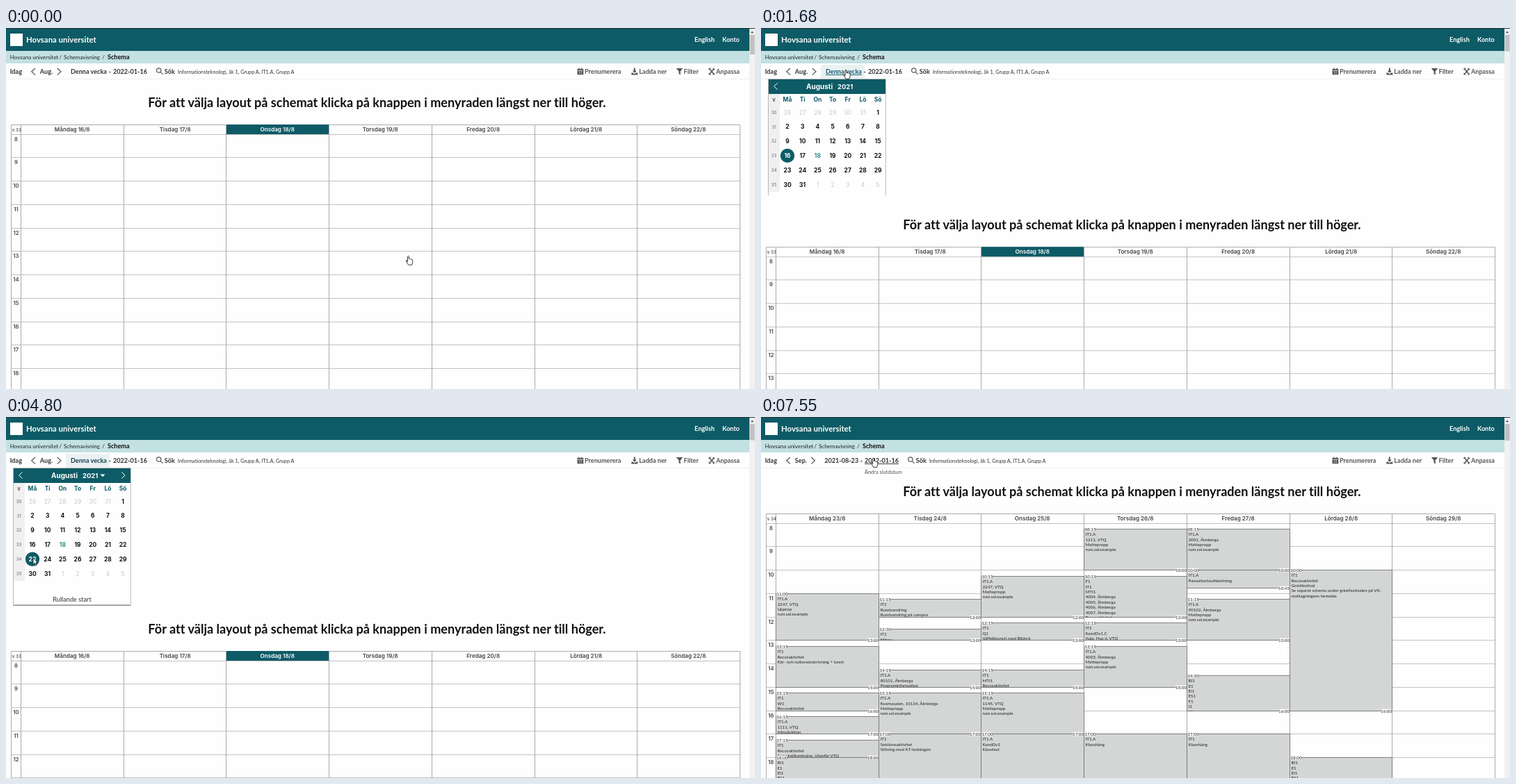
These frames come from a looping animation (1077x520 px, 8000 ms). An HTML page:

```html
<!DOCTYPE html>
<html lang="sv">
<head>
<meta charset="utf-8">
<title>Schema</title>
<style>
  html, body { margin: 0; width: 100%; height: 100%; overflow: hidden; background: #fefefe; }
  text { white-space: pre; }
  #stage { display: block; font: 700 9.1px Lato, sans-serif; font-variant-ligatures: none; fill: #333; }
  .geo { font-family: Inter, sans-serif; }
  .line { fill: none; stroke: #555; stroke-width: 1.2; }
</style>
</head>
<body>
<svg id="stage" width="1077" height="520" viewBox="0 0 1077 520"></svg>
<script>
const TEAL = '#0d5b66', LOOP = 8000, OPEN = 198;
const DAYS = ['Måndag', 'Tisdag', 'Onsdag', 'Torsdag', 'Fredag', 'Lördag', 'Söndag'];
const URL_LINE = 'rum.sal.example', HOUSE = 'Ålmberga', HALL = 'VTQ';
const MATH = 'Mattepropp|' + URL_LINE, EVENT = 'Recceaktivitet', PROGRAMS = 'BI1|E1|EI1|ES1';

// day, start hour, end hour, lines
const EVENTS = [
  [0, 11, 13, `IT1.A|2247, ${HALL}|Upprop|${URL_LINE}`],
  [0, 13.25, 15, `IT1|${EVENT}|Kår- och nationsinskrivning + lunch`],
  [0, 15.25, 16, `IT1|W1|${EVENT}`],
  [0, 16.25, 17, `IT1.A|1111, ${HALL}|Introduktion`],
  [0, 17.25, 18, `IT1|${EVENT}|Servetstillverkning, Utanför ${HALL}`],
  [0, 18, 22, PROGRAMS],
  [1, 11.25, 12, 'IT1|Rundvandring|Rundvandring på campus'],
  [1, 12.5, 13, 'IT1|Mässa'],
  [1, 14.25, 15, `IT1.A|80101, ${HOUSE}|Programinformation`],
  [1, 15.25, 17, `IT1.A|Kvarnasalen, 10134, ${HOUSE}|${MATH}`],
  [1, 17, 22, 'IT1|Sektionsaktivitet|Sittning med KT-ledningen'],
  [2, 10.25, 12, `IT1.A|2247, ${HALL}|${MATH}`],
  [2, 12.25, 13, 'IT1|Q1|Våffelbrunch med Bildvrå'],
  [2, 14.25, 15, `IT1|MTI1|${EVENT}`],
  [2, 15.25, 17, `IT1.A|1145, ${HALL}|${MATH}`],
  [2, 17, 22, 'IT1.A|KandDv1|Klassfest'],
  [3, 8.25, 10, `IT1.A|1211, ${HALL}|${MATH}`],
  [3, 10.25, 12, `F1|IT1|MTI1|4004, ${HOUSE}|4005, ${HOUSE}|4006, ${HOUSE}|4007, ${HOUSE}|${EVENT}`],
  [3, 12.25, 13, `IT1|KandDv1.C|Aula, Hus 6, ${HALL}`],
  [3, 13.25, 15, `IT1.A|4003, ${HOUSE}|${MATH}`],
  [3, 17, 22, 'IT1.A|Klasshäng'],
  [4, 8.25, 10, `IT1.A|2001, ${HOUSE}|${MATH}`],
  [4, 10, 10.75, 'IT1.A|Passerkortsuthämtning'],
  [4, 11.25, 13, `IT1.A|90102, ${HOUSE}|${MATH}`],
  [4, 14.5, 16, PROGRAMS + '|F1|I1|IT1'],
  [4, 17, 22, 'IT1|Klasshäng'],
  [5, 10, 16, `IT1|${EVENT}|Gnistfestival|Se separat schema under gnistfestivalen på VK-|mottagningens hemsida.`],
  [5, 18, 22, PROGRAMS],
];

const text = (x, y, s, attrs = '') => `<text x="${x}" y="${y}" ${attrs}>${s}</text>`;
const mid = (x, y, s, attrs = '') => text(x, y, s, 'text-anchor="middle" ' + attrs);
const rect = (x, y, w, h, fill, attrs = '') =>
  `<rect x="${x}" y="${y}" width="${w}" height="${h}" fill="${fill}" ${attrs}/>`;
const path = (d, attrs = 'class="line"') => `<path d="${d}" ${attrs}/>`;
const range = n => [...Array(n).keys()];

// Grid positions, snapped to pixel centres
const snap = v => Math.floor(v) + .5;
const colX = d => snap(21.4 + 147.75 * d);
const hourY = h => snap(153.2 + 33.75 * (h - 8));
const clock = h => String(Math.floor(h)).padStart(2, '0') + ':' + String(h % 1 * 60).padStart(2, '0');

function eventBox([day, from, to, lines]) {
  const x = colX(day), w = colX(day + 1) - x, y = hourY(from), h = hourY(to) - y;
  const rows = lines.split('|').map((s, i) => text(2, 9.9 + 7.35 * i, s)).join('');
  return rect(x, y, w, h, '#d4d6d6', 'stroke="#777" stroke-width=".9"') +
    `<svg x="${x}" y="${y}" width="${w}" height="${h}">${rows}</svg>`;
}

function eventTimes([day, from, to]) {
  const x = colX(day), right = colX(day + 1), y = hourY(from), end = hourY(to);
  return rect(x + 1, y - 2.7, 15.6, 5.6, '#fefefe') + text(x + 1, y + 2.4, clock(from)) +
    rect(right - 16, end - 2.7, 15.6, 5.6, '#fefefe') +
    text(right - .4, end + 2.4, clock(to), 'text-anchor="end"');
}

function schedule(id, week, date, today, events) {
  let s = mid(533.5, 113.5, 'För att välja layout på schemat klicka på knappen i menyraden längst ner till höger.',
    'font-size="18.1" fill="#111"');
  s += path(range(14).map(i => `M7.5 ${hourY(8 + i)}H1055.5`).join(''), 'stroke="#c2c2c2"');
  s += path('M7.5 139.5H1055.5M7.5 139.5V760' + range(8).map(d => `M${colX(d)} 139.5V760`).join(''),
    'stroke="#aaa"');
  s += '<g class="geo" font-size="8.1" font-weight="600" fill="#444">';
  s += text(8.8, 148.8, 'v ' + week, 'font-size="6.2" font-weight="500"');
  if (today >= 0) s += rect(317, 139, 147, 14, TEAL);
  DAYS.forEach((name, d) => {
    s += mid(colX(d) + 73.7, 149.2, `${name} ${date + d}/8`, d === today ? 'fill="#fff"' : '');
  });
  for (const i of range(14)) s += mid(14.4, hourY(8 + i) + 9.7, 8 + i, 'font-size="7.7"');
  s += '</g><g font-size="6.24" font-weight="400" fill="#222">';
  s += events.map(eventBox).join('') + events.map(eventTimes).join('');
  return `<g id="${id}">${s}</g></g>`;
}

// Left half of the toolbar; dx moves everything after the start date
function period(id, month, arrow, start, from, dx) {
  return `<g id="${id}">` +
    text(48.8, 66, month) + path(`M${arrow} 58l5.2 4.8l-5.2 4.8`) +
    text(start, 66, from, `id="${id}From"`) + text(147.6 + dx, 66, '-') +
    text(154 + dx, 66, '2022-01-16', `id="${id}To"`) +
    `<circle cx="${219.8 + dx}" cy="61" r="3.2" class="line"/>` + path(`M${222.2 + dx} 63.4l3.4 3.4`) +
    text(227.8 + dx, 66, 'Sök') +
    text(247 + dx, 65.6, 'Informationsteknologi, åk 1, Grupp A, IT1.A, Grupp A', 'font-size="7.25" font-weight="400"') +
    '</g>';
}

const dayX = i => 38 + 21.68 * i, weekY = i => 121.5 + 20.8 * i;

function chosen(id, row, n) {
  return `<g id="${id}"><circle cx="38" cy="${weekY(row)}" r="10.2" fill="${TEAL}"/>` +
    mid(38, weekY(row) + 3.1, n, 'fill="#fff"') + '</g>';
}

function calendar() {
  let s = rect(10.5, 73.5, 168.7, 197.5, '#fefefe', 'stroke="#b0b0b0" stroke-width=".9"');
  s += path('M10.5 271.2H179.3', 'stroke="#888" stroke-width="1.2"');
  s += rect(11, 74, 168, 21, TEAL) + rect(11, 95, 16, 141, '#f0f0f0');
  s += '<g class="geo" font-size="8.5">';
  s += text(65, 87.7, 'Augusti', 'font-size="10" fill="#fff"') + text(110, 87.7, '2021', 'font-size="9.4" fill="#fff"');
  s += mid(18.6, 106, 'v', 'font-size="8" font-weight="500"');
  ['Må', 'Ti', 'On', 'To', 'Fr', 'Lö', 'Sö'].forEach((d, i) => s += mid(dayX(i), 106.2, d, `fill="${TEAL}"`));
  for (const row of range(6)) {
    s += mid(18.6, weekY(row) + 2.3, 30 + row, 'font-size="6.2" font-weight="400" fill="#666"');
    for (const i of range(7)) {
      const n = row * 7 + i - 5, outside = n < 1 || n > 31;
      const look = outside ? 'font-weight="400" fill="#c8c8c8"' : n === 18 ? 'fill="#2a8c8c"' : 'fill="#111"';
      s += mid(dayX(i), weekY(row) + 3.1, n < 1 ? n + 31 : n > 31 ? n - 31 : n, look);
    }
  }
  s += chosen('sel16', 3, 16) + chosen('sel23', 4, 23) + '</g>';
  s += mid(95, 266.2, 'Rullande start', 'font-weight="400" font-size="9.2"');
  s += path('M23.6 79.2L18.8 84l4.8 4.8', 'fill="none" stroke="#fff"');
  s += `<g id="more">${path('M166.2 79.2l4.8 4.8l-4.8 4.8', 'fill="none" stroke="#fff"')}${path('M135.5 82.5h7l-3.5 3.8z', 'fill="#fff"')}</g>`;
  return `<svg id="cal" x="0" y="0" width="200">${s}</svg>`;
}

function icons() {
  return '<g fill="#555">' +
    path('M821.5 59h8.8v8.3h-8.8zM823 57.8h1.5v1.5h-1.5zM827.3 57.8h1.5v1.5h-1.5z', '') +
    path('M822.3 61.3h7.2M824 63.3h1.4m1.2 0h1.4M824 65.4h1.4m1.2 0h1.4', 'stroke="#fefefe" stroke-width=".8"') +
    path('M902.8 57.5h2v4h2l-3 3.3l-3-3.3h2zM899.3 64.5h2l2.5 1.8l2.5-1.8h2v3h-9z', '') +
    path('M963.8 58h9.4l-3.5 4.6v5l-2.2-1.5v-3.5z', '') +
    path('M1011.5 59l6.5 7.5M1018 59l-6.5 7.5', 'stroke="#555" stroke-width="1.5"') +
    path('M1010.3 59.5l2.7-1.6M1016.5 58l2.6 2M1010.3 65.5l2.5 2M1016.6 67.5l2.5-1.8', 'stroke="#555" stroke-width="1.4"') +
    text(832, 66, 'Prenumerera') + text(910.3, 66, 'Ladda ner') +
    text(974.5, 66, 'Filter') + text(1021, 66, 'Anpassa') + '</g>';
}

const stage = document.getElementById('stage');
stage.innerHTML =
  schedule('weekA', 33, 16, 2, []) + schedule('weekB', 34, 23, -1, EVENTS) +
  rect(0, 0, 1069, 33, TEAL) + rect(0, 0, 1077, 1, '#2b3335') + rect(6, 8, 18, 18, '#fff') +
  text(29, 21.2, 'Hovsana universitet', 'font-size="11.4" fill="#fff"') +
  text(990, 20.3, 'English', 'fill="#fff"') + text(1030, 20.3, 'Konto', 'fill="#fff"') +
  rect(0, 33, 1069, 18, '#c3e0e2') +
  '<g font-size="8" font-weight="400" fill="#222">' + text(5.8, 45, 'Hovsana universitet') +
  text(76.6, 45, '/') + text(83, 45, 'Schemavisning') + text(138.2, 45, '/') + '</g>' +
  text(146, 45.2, 'Schema', 'fill="#111"') +
  rect(0, 73, 1069, 1, '#f0f0f0') + rect(86, 53, 63, 19.5, '#e9f1f3', 'id="linkBg"') +
  text(5.8, 66, 'Idag') + path('M42 58l-5.2 4.8l5.2 4.8') +
  period('barA', 'Aug.', 73.8, 93, 'Denna vecka', 0) +
  period('barB', 'Sep.', 72.2, 91.2, '2021-08-23', -5) + icons() +
  '<g font-size="7.4" font-weight="400" fill="#555">' + text(93, 82, 'Ändra startdatum', 'id="tipA"') +
  text(149, 82, 'Ändra slutdatum', 'id="tipB"') + '</g>' + calendar() +
  rect(1069, 1, 8, 519, '#f1f1f1') + path('M1070.8 7.2h4.4l-2.2-2.6z', 'fill="#555"') +
  rect(1069.8, 10, 6.8, 24, '#c1c1c1', 'id="thumb"') +
  '<g id="cursor" fill="#fff" stroke="#222" stroke-width=".9" stroke-linejoin="round">' +
  path('M-1 8.6V1Q0-.7 1 1V4.6Q2 4 2.7 5Q3.8 4.5 4.4 5.4Q6 5 6.2 6.6V9.5L5 13.3H.2L-3 8Q-3.4 6.3-2 6.8Z', 'id="hand"') +
  path('M0 0V9.4L2.2 7.4L3.7 10.8L5.2 10.2L3.7 6.8H6.6Z', 'id="arrow"') + '</g>';

// time, x, y of the pointer tip
const TRACK = [
  [400, 578.5, 328], [970, 112, 70], [1080, 122, 60], [2500, 122, 60], [2550, 122.5, 62],
  [2990, 47, 204], [3380, 47, 204], [3500, 54, 210], [3650, 39, 203], [6050, 39, 203],
  [6700, 150, 65], [6820, 153, 57], [6920, 153, 57], [7020, 160, 58], [7549, 160, 58], [7550, 161.5, 59],
];
const clamp = k => Math.min(1, Math.max(0, k));
const swing = k => .5 - Math.cos(Math.PI * clamp(k)) / 2;

function pointer(t) {
  const i = TRACK.findIndex(p => p[0] > t);
  if (i === 0) return TRACK[0].slice(1);
  if (i < 0) return TRACK[TRACK.length - 1].slice(1);
  const [t0, x0, y0] = TRACK[i - 1], [t1, x1, y1] = TRACK[i];
  const k = swing((t - t0) / (t1 - t0));
  return [x0 + (x1 - x0) * k, y0 + (y1 - y0) * k];
}

const el = id => document.getElementById(id);
const set = (id, name, value) => el(id).setAttribute(name, value);
const show = (id, on) => set(id, 'display', on ? 'inline' : 'none');

function draw(t) {
  const loaded = t >= 5250, open = swing((t - 1440) / 307);
  const overFrom = t > 1015 && t < 2640, overTo = t > 6730;
  const calOn = open > 0 && !loaded;

  for (const id of ['weekA', 'barA']) show(id, !loaded);
  for (const id of ['weekB', 'barB']) show(id, loaded);
  set('weekA', 'transform', `translate(0 ${OPEN * open})`);

  show('cal', calOn);
  set('cal', 'height', open < 1 ? 65 + OPEN * open : 280);
  show('more', open === 1);
  const pick = clamp((t - 4650) / 150);
  set('sel16', 'opacity', 1 - pick);
  set('sel23', 'opacity', pick);

  show('linkBg', t >= 1440 && !loaded);
  set('barAFrom', 'text-decoration', overFrom ? 'underline' : 'none');
  set('barAFrom', 'fill', overFrom ? '#155a70' : calOn ? '#173f4d' : '#333');
  set('barBTo', 'text-decoration', overTo ? 'underline' : 'none');
  show('tipA', overFrom && t < 1440);
  show('tipB', overTo);

  set('thumb', 'height', t < 80 ? 28 : loaded ? 97 - 73 * clamp((t - 5250) / 240) : 23.5);

  const [x, y] = pointer(t), hand = t < 2640 || overTo;
  set('cursor', 'transform', `translate(${x} ${y})`);
  show('hand', hand);
  show('arrow', !hand);
}

const start = performance.now();
function tick() {
  draw((performance.now() - start) % LOOP);
  requestAnimationFrame(tick);
}
tick();
</script>
</body>
</html>
```
